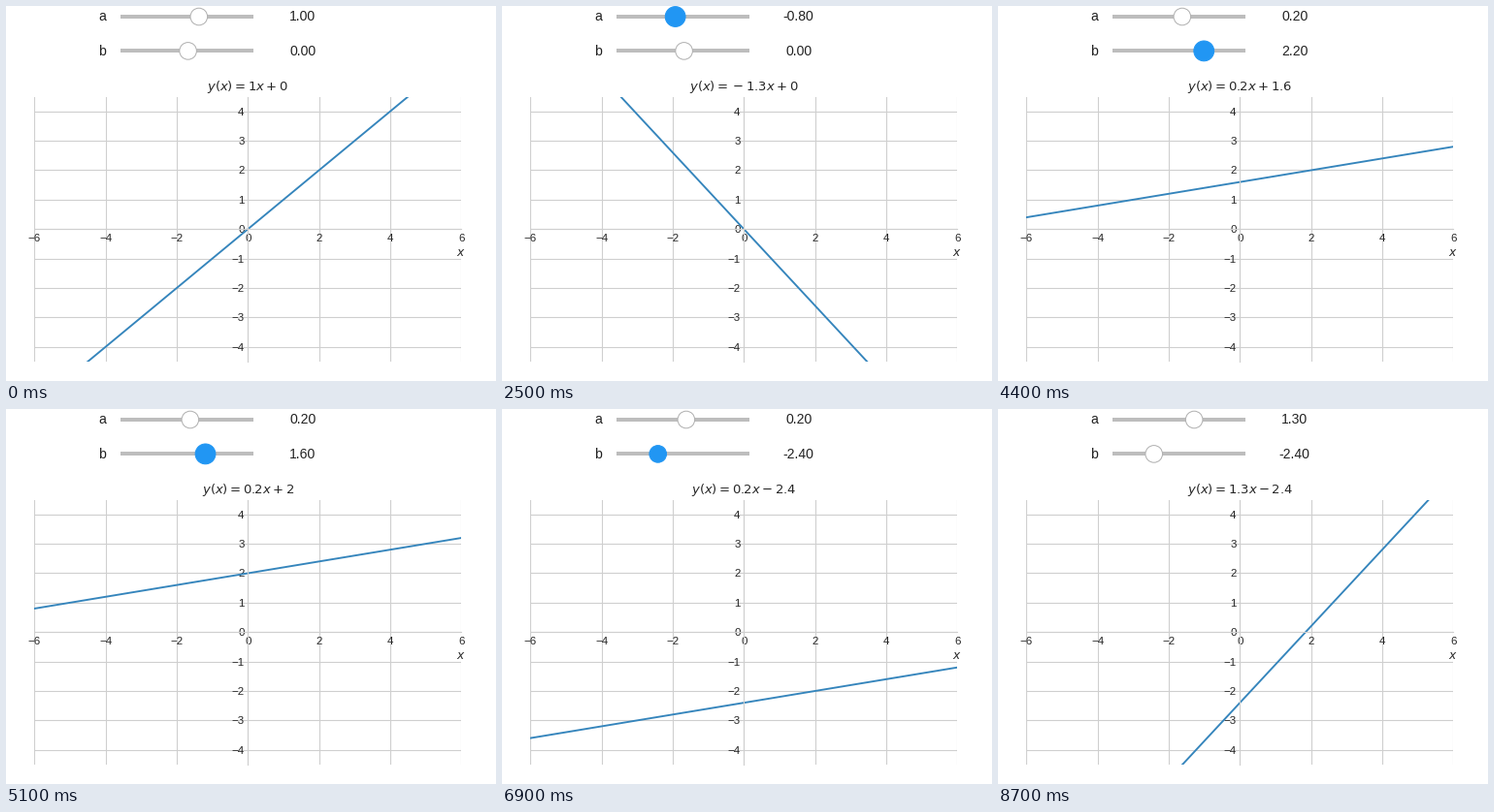
Write a matplotlib script that moves like this. It is 505 px wide and 387 px high and loops after 8.8 s.

```python
import matplotlib.pyplot as plt
from matplotlib.animation import FuncAnimation
from matplotlib.patches import Circle, Rectangle

W, H, DPI = 505, 387, 100
FRAMES, INTERVAL = 88, 100
PLOT_LAG = 2  # the curve follows the sliders with a delay
PX = 72 / DPI  # points per pixel
INK, UI_INK, GRID, TRACK = "#262626", "#212121", "#cfcfcf", "#bdbdbd"
BLUE, CURVE = "#2196f3", "#3585bc"

plt.rcParams.update({
    "font.family": "Liberation Sans",
    "mathtext.fontset": "dejavusans",
    "axes.axisbelow": True,
})

fig = plt.figure(figsize=(W / DPI, H / DPI), dpi=DPI, facecolor="white")
ui = fig.add_axes([0, 0, 1, 1])
ui.set(xlim=(0, W), ylim=(H, 0))
ui.axis("off")


def label(x, y, text, size, color=INK, ha="center"):
    return ui.text(x, y, text, fontsize=size * PX, color=color, ha=ha,
                   va="baseline")


def within(spans, frame):
    return any(first <= frame < last for first, last in spans)


class Slider:
    """A slider dragged in straight strokes of (start, end, new value)."""

    def __init__(self, name, y, value, strokes, active, pressed):
        self.start_value, self.strokes = value, strokes
        self.active, self.pressed = active, pressed
        self.y = y
        ui.add_patch(Rectangle((118, y - 2), 137, 4, fc=TRACK, ec="none"))
        self.handle = ui.add_patch(Circle((0, y), 9, lw=PX, zorder=3))
        label(103, y + 4.2, name, 14, UI_INK, "right")
        self.readout = label(305.7, y + 4.2, "", 14, UI_INK)

    def value(self, frame):
        value = self.start_value
        for start, end, goal in self.strokes:
            progress = min(max((frame - start) / (end - start), 0), 1)
            value += (goal - value) * progress
        return round(value, 1) + 0.0

    def update(self, frame):
        value = self.value(frame)
        active = within(self.active, frame)
        self.handle.center = (187.6 + 11.2 * value, self.y)
        self.handle.set_radius(10.4 if within(self.pressed, frame) else 8.8)
        self.handle.set_facecolor(BLUE if active else "white")
        self.handle.set_edgecolor(BLUE if active else "#b0b0b0")
        self.readout.set_text(f"{value:.2f}")


sliders = [
    Slider("a", 11, 1.0,
           strokes=[(12, 17, -1.5), (18, 19, -1.3), (23, 29, 0.2),
                    (73, 77, 1.3)],
           active=[(10, 38), (71, 87)], pressed=[(13, 32), (74, 79)]),
    Slider("b", 46.4, 0.0,
           strokes=[(37, 45, 2.5), (46, 53, 1.3), (55, 57, -0.1),
                    (57, 59, -0.7), (60, 63, -1.4), (64, 65, -2.5),
                    (66, 67, -2.4)],
           active=[(34, 74)], pressed=[(38, 67)]),
]
title = label(249.2, 87, "", 13.1)
label(468.9, 258, "$x$", 12.1)

LEFT, TOP, WIDTH, HEIGHT = 29.3, 93.55, 440, 273.4
ax = fig.add_axes([LEFT / W, 1 - (TOP + HEIGHT) / H, WIDTH / W, HEIGHT / H])
ax.set(xlim=(-6, 6), ylim=(-4.5, 4.5),
       xticks=range(-6, 7, 2), yticks=range(-4, 5))
ax.patch.set_visible(False)
ax.grid(True, color=GRID, lw=1.1 * PX)
ax.xaxis.get_major_ticks()[-1].gridline.set_visible(False)
for side in ("top", "right"):
    ax.spines[side].set_visible(False)
for side in ("left", "bottom"):
    ax.spines[side].set(position="zero", color=GRID, linewidth=1.1 * PX)
ax.tick_params(length=0, labelsize=11.5 * PX, labelcolor=INK)
ax.tick_params(axis="x", pad=4.4 * PX)
ax.tick_params(axis="y", pad=3.6 * PX)
curve, = ax.plot([], [], color=CURVE, lw=1.9 * PX)


def update(frame):
    for slider in sliders:
        slider.update(frame)
    a, b = (slider.value(frame - PLOT_LAG) for slider in sliders)
    curve.set_data([-6, 6], [b - 6 * a, b + 6 * a])
    # the empty group keeps binary spacing around a leading minus
    title.set_text(f"$y(x) = {{}}{a:g}x {b:+g}$")
    return []


anim = FuncAnimation(fig, update, frames=FRAMES, interval=INTERVAL,
                     init_func=lambda: update(0), repeat=True, repeat_delay=0)
plt.show()
```
